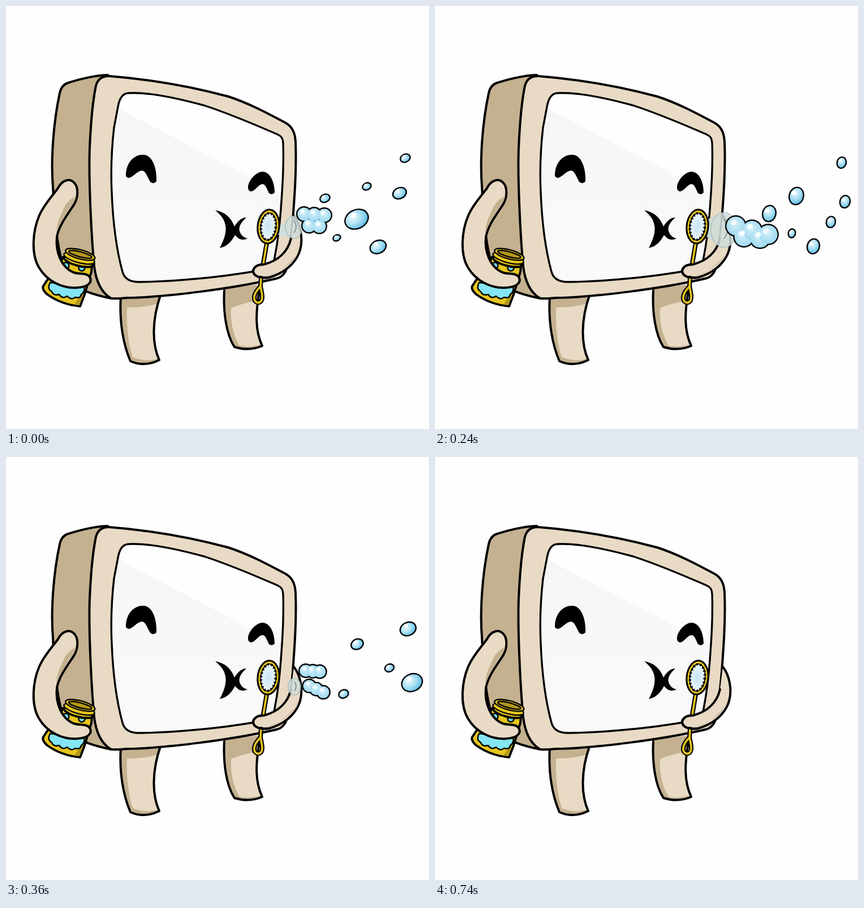
Write an HTML page that moves like this. It is 748 px wide and 748 px high and loops after 840 ms.

```html
<!DOCTYPE html>
<html lang="en">
<head>
<meta charset="utf-8">
<title>Blowing bubbles</title>
<style>
  html, body { margin: 0; width: 100%; height: 100%; overflow: hidden; background: #fefefe; }
  svg { display: block; width: 100%; height: 100%; }
  .ink { stroke: #000; stroke-width: 4; stroke-linejoin: round; stroke-linecap: round; }
  .fine { stroke-width: 2.4; }
  .light { fill: #e8dac4; }
  .dark { fill: #c4b190; }
  .gold { fill: #e6c51c; }
  .olive { fill: #b3971a; }
  .none { fill: none; }
  .puff { opacity: 0; }
</style>
</head>
<body>
<svg viewBox="0 0 748 748">
  <defs>
    <radialGradient id="ball" cx=".4" cy=".36" r=".66">
      <stop offset="0" stop-color="#e6f7fd"/>
      <stop offset=".4" stop-color="#bae6f6"/>
      <stop offset=".75" stop-color="#84cfec"/>
      <stop offset="1" stop-color="#56b6de"/>
    </radialGradient>
    <radialGradient id="foam" cx=".45" cy=".4" r=".6">
      <stop offset="0" stop-color="#d8f1fa"/>
      <stop offset=".55" stop-color="#b5e3f4"/>
      <stop offset="1" stop-color="#9dd9f0"/>
    </radialGradient>
    <radialGradient id="soap">
      <stop offset="0" stop-color="#c5e4f4"/>
      <stop offset="1" stop-color="#ecf6fb"/>
    </radialGradient>
    <linearGradient id="glass" x1="0" y1="0" x2="0" y2="1">
      <stop offset="0" stop-color="#f6f6f6"/>
      <stop offset="1" stop-color="#fafafa"/>
    </linearGradient>
    <clipPath id="screenClip">
      <path id="screen" d="M216 154C250 152 300 162 351 176C400 192 450 214 480 227Q490 231 490 242C492 290 488 330 486 360C483 400 479 425 475 445Q472 463 456 466C390 479 300 487 238 488Q211 489 206 470C195 430 189 380 187 330C185 290 187 250 191 215L198 178Q202 155 216 154Z"/>
    </clipPath>
    <path id="loop" d="M450 496C441 505 437 514 440 521C445 528 453 524 453 515C453 507 451 502 450 496"/>
  </defs>

  <!-- legs -->
  <g>
    <path class="dark" d="M203 514C200 560 208 600 220 628Q245 639 271 626C258 598 258 555 273 512Z"/>
    <path class="light" d="M214 533Q242 534 269 526C258 560 260 600 269 624Q245 630 224 621C216 596 213 566 214 533Z"/>
    <path class="ink none" d="M203 514C200 560 208 600 220 628Q245 639 271 626C258 598 258 555 273 512"/>
    <path class="dark" d="M386 500C384 540 389 580 404 603Q430 611 453 601C441 575 440 545 450 492Z"/>
    <path class="light" d="M398 534Q420 525 445 521C439 555 442 578 451 599Q432 604 413 601C401 580 397 560 398 534Z"/>
    <path class="ink none" d="M386 503C384 540 389 580 404 603Q430 611 453 601C441 575 440 545 450 494"/>
  </g>

  <!-- cabinet -->
  <path class="ink dark" d="M180 122C152 123 126 131 109 136Q98 140 95 154C84 205 79 270 83 320C86 375 89 410 96 440C102 470 108 487 124 497Q150 510 186 517L220 300Z"/>
  <path class="ink light" d="M186 517C165 505 157 480 155 450C150 390 146 300 148 250C150 205 153 170 159 141Q164 123 183 124C260 130 330 143 393 160C430 172 465 191 495 207Q511 216 512 240C514 290 510 340 507 380C504 410 502 440 497 462Q492 479 478 482C400 500 280 515 215 516Q195 518 186 517Z"/>
  <use href="#screen" fill="#fefefe"/>
  <path clip-path="url(#screenClip)" fill="url(#glass)" d="M180 172L240 203L500 338V500H180Z"/>
  <use href="#screen" class="ink none" style="stroke-width:3.4"/>

  <!-- face -->
  <path d="M212 298C213 275 228 262 244 263C258 264 267 285 266 310Q262 316 255 311C250 302 247 292 241 291C232 291 225 303 217 304Q211 303 212 298Z"/>
  <path d="M428 319C430 306 444 292 455 293C468 295 475 312 475 330Q471 335 465 331C461 322 458 314 453 315C446 316 441 327 433 328Q427 326 428 319Z"/>
  <path d="M370 361C386 364 398 373 404 390C411 378 418 374 425 374C416 382 411 390 413 398C416 407 421 409 427 411C417 416 411 412 405 405C399 416 392 425 378 428C387 411 390 398 388 388C386 376 379 369 370 361Z"/>

  <!-- jar -->
  <g>
    <path class="ink gold" d="M101 444C98 452 91 458 87 463L66 495Q63 501 73 510Q98 528 131 531L139 510L151 470L152 458Z"/>
    <path class="olive" d="M139 500L136 510L130 529L121 528Z"/>
    <path fill="#84e6f4" class="ink fine" d="M78 489Q72 500 81 505Q84 513 94 510Q100 519 108 513Q116 521 122 515Q132 518 133 510Q140 506 138 496Z"/>
    <g class="ink fine" fill="#6fd3e6"><circle cx="106" cy="459" r="5.5"/><circle cx="134" cy="463" r="5.5"/></g>
    <g transform="translate(130 444) rotate(15)">
      <ellipse class="ink gold" cy="8" rx="26" ry="7.5"/>
      <ellipse class="ink gold fine" cy="2" rx="28" ry="8"/>
      <ellipse class="ink gold fine" cy="-5" rx="27" ry="8"/>
      <ellipse class="ink olive fine" cy="-5" rx="21" ry="4.5"/>
    </g>
  </g>

  <!-- arm with jar -->
  <path class="ink light" d="M92 322C99 308 112 304 120 312C129 320 128 340 119 353C107 371 94 388 90 408C87 435 98 462 119 471C130 475 142 471 148 479C154 490 143 497 126 498C99 500 72 486 58 462C44 438 47 398 59 370C68 350 81 337 92 322Z"/>
  <path class="dark" d="M124 336Q106 345 101 361C92 378 89 390 89 402C95 385 106 367 117 351Q123 343 124 336Z"/>

  <!-- arm with wand -->
  <path class="light" d="M509 371C520 385 526 410 520 432C512 457 490 473 465 480C449 482 437 478 437 468C439 460 446 457 456 457C480 451 498 436 504 411Z"/>
  <path class="dark" d="M519 424C513 453 488 469 460 477Q490 473 519 432Z"/>
  <path class="ink none" d="M509 371C520 385 526 410 520 432C512 457 490 473 465 480C449 482 437 478 437 468C439 460 446 457 456 457C480 451 498 436 504 411"/>

  <!-- foam and bubbles, filled in by script -->
  <g id="air"></g>

  <!-- wand -->
  <g>
    <path class="ink none" style="stroke-width:8" d="M461 420L455 455M451 481L450 497"/>
    <use href="#loop" class="ink none" style="stroke-width:8"/>
    <path class="none" stroke="#e6c51c" stroke-width="3.6" d="M461 419L455 456M451 480L450 498"/>
    <use href="#loop" class="none" stroke="#e6c51c" stroke-width="3.6"/>
    <g transform="translate(464 390) rotate(6)">
      <ellipse class="ink gold" rx="19" ry="30" style="stroke-width:3"/>
      <ellipse rx="13.5" ry="24" fill="url(#soap)" stroke="#000" stroke-width="1.8"/>
      <ellipse class="none" rx="13" ry="23.5" stroke="#000" stroke-width="4.5" stroke-dasharray="2.4 4"/>
    </g>
    <path class="ink none" d="M437 468C439 460 446 457 456 457M437 468C437 478 449 482 465 480"/>
  </g>
</svg>

<script>
  const NS = 'http://www.w3.org/2000/svg';
  const LOOP = 840, STEP = 120;
  const air = document.getElementById('air');

  function add(parent, tag, attrs) {
    const el = document.createElementNS(NS, tag);
    for (const key in attrs) el.setAttribute(key, attrs[key]);
    parent.appendChild(el);
    return el;
  }

  function oval(g, x, y, rx, ry, turn, attrs) {
    return add(g, 'ellipse', { rx, ry, transform: `translate(${x} ${y}) rotate(${turn})`, ...attrs });
  }

  const mix = (a, b, t) => a + (b - a) * t;

  // One group per step of the blow, each shown for its own share of the loop.
  const puffs = Array.from({ length: 5 }, (_, i) => {
    const g = add(air, 'g', { class: 'puff' });
    const key = (opacity, time) => ({ opacity, offset: time / LOOP, easing: 'steps(1, end)' });
    g.animate([key(0, 0), key(1, i * STEP), key(0, (i + 1) * STEP), key(0, LOOP)],
      { duration: LOOP, iterations: Infinity });
    return g;
  });

  // Lobes zigzag around the line from a to b; the swing goes from s0 to s1.
  function zigzag(n, a, b, r, s0, s1 = s0) {
    return Array.from({ length: n }, (_, i) => {
      const t = i / (n - 1), side = i % 2 ? 1 : -1;
      return { x: mix(a[0], b[0], t), y: mix(a[1], b[1], t) + side * mix(s0, s1, t), rx: r, ry: r, turn: 0 };
    });
  }

  // Overlapping lobes share a single outline.
  function foam(g, lobes) {
    const layer = (grow, attrs) => lobes.forEach(l => oval(g, l.x, l.y, l.rx + grow, l.ry + grow, l.turn, attrs));
    layer(1, { fill: '#000' });
    layer(-1.4, { fill: 'url(#foam)' });
    lobes.forEach(l => oval(g, l.x - l.rx * .2, l.y - l.ry * .35, l.rx * .32, l.ry * .25, l.turn - 25, { fill: '#f3fcff' }));
  }

  // A clear, swelling tube of soap film with a crease near its end.
  function plume(g, a, b, r0, r1) {
    const tube = add(g, 'g', { opacity: .85 });
    for (let i = 0; i < 4; i++) {
      const t = i / 3, r = mix(r0, r1, t);
      oval(tube, mix(a[0], b[0], t), mix(a[1], b[1], t), r * .75, r, 0,
        { fill: `hsl(${mix(195, 170, t)} ${mix(45, 14, t)}% 84%)` });
    }
    oval(tube, ...b, r1 * .75, r1, 0, { fill: 'none', stroke: '#93b3b8', 'stroke-width': 1.2 });
    add(g, 'path', { d: `M${b[0]} ${b[1] - r1 * .6}q${r1 * .4} ${r1 * .6} 0 ${r1 * 1.1}`,
      fill: 'none', stroke: '#5d6d6d', 'stroke-width': 1.2 });
  }

  // A bubble flies along its path, one point per step, and wobbles on the way.
  function drift(first, r0, r1, path) {
    const points = path.split(' ').map(p => p.split(',').map(Number));
    points.forEach(([x, y], i) => {
      const step = first + i, g = puffs[step];
      const r = mix(r0, r1, i / Math.max(1, points.length - 1));
      const wobble = .12 * Math.cos(step * 1.9);
      oval(g, x, y, r * (1 + wobble) - 1, r * (1 - wobble) - 1, -25 * Math.sign(wobble) * (wobble < 0 ? .6 : 1),
        { fill: 'url(#ball)', stroke: '#000', 'stroke-width': 2.4 });
      oval(g, x - r * .3, y - r * .35, r * .3, r * .22, -30, { fill: '#fff' });
    });
  }

  plume(puffs[0], [485, 398], [509, 391], 8, 20);
  foam(puffs[0], zigzag(5, [527, 378], [563, 380], 13, 10));

  plume(puffs[1], [482, 406], [511, 411], 11, 22);
  foam(puffs[1], zigzag(5, [536, 426], [582, 417], 15, -5, -20));

  plume(puffs[2], [488, 393], [511, 396], 18, 31);
  foam(puffs[2], zigzag(5, [532, 398], [589, 408], 18, 9, 4));

  plume(puffs[3], [508, 405], [510, 406], 13, 15);
  foam(puffs[3], zigzag(6, [530, 390], [561, 398], 12, 12, 18));

  const splat = { x: 663, y: 362, rx: 29, ry: 13, turn: -13 };
  foam(puffs[4], [...zigzag(2, [653, 350], [677, 343], 11, 0), splat]);

  drift(0, 9, 10, '564,340 640,285 719,277');
  drift(0, 8, 18, '638,319 684,300');
  drift(0, 9, 9, '706,269 734,270');
  drift(0, 12, 12, '696,331');
  drift(0, 20, 11, '620,377 686,357 725,346');
  drift(0, 7, 10, '585,410 640,398 700,382');
  drift(0, 14, 13, '658,426 729,398');
  drift(1, 16, 13, '627,338 639,336 711,304 723,269');
  drift(1, 8, 18, '623,440 669,425 718,399');
  drift(2, 14, 8, '591,367 621,331 684,302');
  drift(2, 8, 9, '631,402 678,373 714,369');
  drift(3, 9, 9, '597,419');
</script>
</body>
</html>
```
